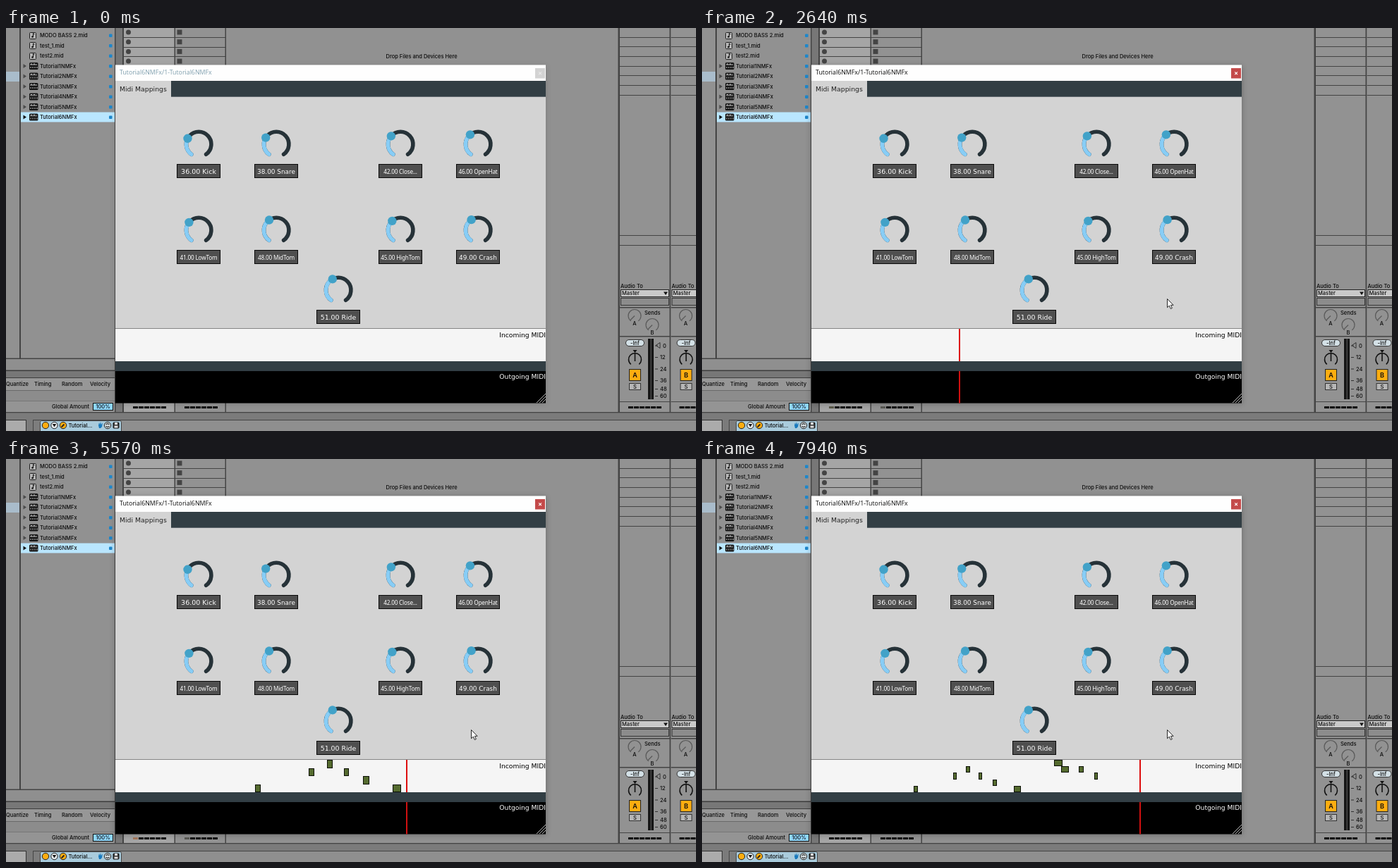
An HTML page that plays this animation: 978x572 px, repeating every 8000 ms.

```html
<!DOCTYPE html>
<html lang="en">
<head>
<meta charset="utf-8">
<title>Midi Mappings</title>
<style>
html, body { margin: 0; width: 100%; height: 100%; overflow: hidden; background: #919191; }
svg { display: block; width: 978px; height: 572px; }
text { white-space: pre; }
.ui { font: 500 7.5px Inter, sans-serif; fill: #0c0c0c; }
.plug { font: 9.2px "DejaVu Sans", sans-serif; }
.tight { font: 8.2px "Noto Sans", sans-serif; letter-spacing: -.2px; }
.title { font: 8.8px "Open Sans", sans-serif; }
</style>
</head>
<body>
<svg id="stage" viewBox="0 0 978 572" xmlns="http://www.w3.org/2000/svg"></svg>
<script>
const NS = 'http://www.w3.org/2000/svg';
const stage = document.getElementById('stage');

function add(tag, attrs, content) {
  const el = document.createElementNS(NS, tag);
  for (const k in attrs) el.setAttribute(k, attrs[k]);
  if (content) el.textContent = content;
  stage.appendChild(el);
  return el;
}
const rect = (x, y, width, height, fill, more) => add('rect', { x, y, width, height, fill, ...more });
const box = (x, y, w, h, fill, stroke = '#111', more) =>
  rect(x + .5, y + .5, w - 1, h - 1, fill, { stroke, 'stroke-width': 1, ...more });
const disc = (cx, cy, r, fill, more) => add('circle', { cx, cy, r, fill, ...more });
const path = (d, stroke, width = 1, more) =>
  add('path', { d, fill: 'none', stroke, 'stroke-width': width, ...more });
const shape = (d, fill, more) => add('path', { d, fill, ...more });
const text = (x, y, s, cls = 'ui', more) => add('text', { x, y, class: cls, ...more }, s);
const mid = { 'text-anchor': 'middle' };
const polar = (cx, cy, r, deg) => {
  const a = deg * Math.PI / 180;
  return [cx + r * Math.sin(a), cy - r * Math.cos(a)];
};
function arc(cx, cy, r, from, to) {
  const [x1, y1] = polar(cx, cy, r, from), [x2, y2] = polar(cx, cy, r, to);
  return `M${x1} ${y1}A${r} ${r} 0 ${to - from > 180 ? 1 : 0} 1 ${x2} ${y2}`;
}
function dashes(x, n = 6) {
  for (let i = 0; i < n; i++) rect(x + i * 8, 537, 7, 3, '#0a0a0a');
}

// ---- browser panel ----
function drawBrowser() {
  rect(0, 0, 155, 470, '#919191');
  rect(0, 62, 19, 14, '#a9bccb');
  rect(19, 0, 2, 469, '#444');
  const names = ['MODO BASS 2.mid', 'test_1.mid', 'test2.mid'];
  for (let i = 1; i <= 6; i++) names.push(`Tutorial${i}NMFx`);
  names.forEach((name, i) => {
    const y = 10.5 + i * 14.5;
    if (i === 8) rect(21, 119.5, 134, 14, '#b9e6ff');
    if (i < 3) {
      box(33, Math.round(y) - 5, 10, 10, '#b5b5b5', '#222', { rx: 1 });
      path(`M38.5 ${y + 2}v-5l2 1.5`, '#111');
      disc(37.5, y + 2, 1.3, '#111');
    } else {
      shape(`M24.5 ${y - 3}l4.5 3l-4.5 3z`, i === 8 ? '#111' : '#4a4a4a');
      rect(33, y - 5, 12.5, 10, '#151515', { rx: 1.5 });
      path(`M35 ${y - 1}v-2h2v2m2 0v-2h2v2m2 0v-2M35 ${y + 3}v-2m3 2v-2m3 2v-2m3 2v-2`, '#ddd', .9);
    }
    text(48, y + 2.7, name);
    rect(146, y - 2, 4.5, 4.5, '#1d87cc', { rx: 1 });
  });
  rect(0, 468.5, 155, 1.5, '#444');
  rect(0, 470, 155, 16, '#8f8f8f');
  rect(0, 486, 155, 11, '#777');
  rect(0, 485.5, 155, 1.5, '#3c3c3c');
  rect(0, 496, 155, 1.2, '#3c3c3c');
  rect(0, 497, 155, 17, '#979797');
  rect(0, 514, 155, 1, '#6a6a6a');
  rect(0, 515, 155, 15, '#8c8c8c');
  rect(0, 529, 155, 1, '#777');
  rect(0, 530, 155, 15, '#949494');
  [[0, 'Quantize'], [40, 'Timing'], [79, 'Random'], [119, 'Velocity']].forEach(([x, s]) => text(x, 508, s));
  text(65, 540, 'Global Amount');
  box(123, 532, 29, 11, '#8ed6fb');
  text(137.5, 540.2, '100%', 'ui', mid);
}

// ---- session tracks ----
function drawTracks() {
  rect(155, 0, 11, 545, '#777');
  rect(154, 0, 1.5, 545, '#444');
  rect(165, 0, 2, 545, '#444');
  rect(167, 0, 72, 545, '#a5a5a5');
  rect(240, 0, 71, 545, '#929292');
  for (let i = 0; i < 4; i++) {
    const y = 6 + i * 13.7;
    rect(167, Math.round(y + 7), 144, 1, '#444');
    disc(173.5, y, 3.5, '#444');
    rect(242.5, y - 3.5, 7, 7, '#444');
  }
  rect(238.5, 0, 1.5, 545, '#444');
  rect(310.5, 0, 1.5, 545, '#444');
  rect(167, 531, 144, 1, '#555');
  dashes(180);
  dashes(253);
  text(538.5, 43, 'Drop Files and Devices Here');
}

function returnTrack(x, w, letter) {
  rect(x, 0, w, 545, '#929292');
  for (let i = 1; i <= 7; i++) rect(x, Math.round(i * 13.65) - 1, w, 1, '#444');
  [294, 308].forEach(y => rect(x, y, w, 1, '#444'));
  text(x + 1, 369.3, 'Audio To');
  box(x + 1, 371, 69, 11, '#c9c9c9', '#222');
  text(x + 3, 379.2, 'Master');
  shape(`M${x + 62} 374.5h6l-3 4.5z`, '#111');
  box(x + 1, 383, 69, 11, '#8c8c8c', '#333');
  rect(x, 396, w, 1.5, '#444');
  const knob = (cx, cy, s) => {
    path(arc(cx, cy, 9, 215, 505), '#5a5a5a', 1.2);
    path(`M${cx} ${cy}L${cx - 6} ${cy + 6}`, '#5a5a5a', 1.2);
    text(cx, cy + 13, s, 'ui', mid);
  };
  knob(x + 21, 408.5, 'A');
  text(x + 35, 406.5, 'Sends');
  knob(x + 46, 421.5, 'B');
  rect(x, 437, w, 1.5, '#444');
  box(x + 8, 442, 27, 10, '#d3e0e6', '#333', { rx: 4.5 });
  text(x + 21.5, 449.7, '-Inf', 'ui', mid);
  shape(`M${x + 18.5} 457h6l-3 4z`, '#111');
  path(arc(x + 21.5, 470.5, 9, 220, 500), '#111', 1.6);
  path(`M${x + 21.5} 462v11`, '#111', 1.6);
  box(x + 13, 484, 17, 17, '#ffad10', '#222');
  text(x + 21.5, 495.6, letter, 'ui', { ...mid, style: 'font-size:9px;font-weight:600' });
  box(x + 13, 504, 17, 10, '#b7b7b7', '#333');
  text(x + 21.5, 511.8, 'S', 'ui', mid);
  rect(x + 40, 441, 8, 86, '#151515');
  rect(x + 43.7, 441, .8, 86, '#777');
  path(`M${x + 51} 450.5l6 -4v8z`, '#333');
  [0, 12, 24, 36, 48, 60].forEach((v, i) => {
    const y = [450.5, 467, 483.5, 500, 512, 522][i];
    rect(x + 50, y, 4, 1, '#333');
    text(x + (v ? 57 : 61), y + 3, String(v));
  });
  rect(x, 530, w, 1, '#444');
  dashes(x + 12);
}

function drawFooter() {
  rect(0, 545, 978, 27, '#7b7b7b');
  rect(0, 545, 978, 1.3, '#444');
  box(-1, 556, 30, 20, '#ababab', '#333');
  box(38, 556, 945, 20, '#8f8f8f', '#444');
  rect(39, 557, 9, 15, '#7d7d7d');
  box(48, 557, 116, 20, '#a9cbdc', '#444', { rx: 2 });
  const ring = { stroke: '#222', 'stroke-width': 1 };
  disc(56, 564, 4.7, '#ffad10', ring);
  disc(68.5, 564, 4.7, '#e2e8ea', ring);
  shape('M65.8 562h5.4l-2.7 4.3z', '#111');
  disc(81, 564, 4.7, '#ffad10', ring);
  path('M78.5 566.5l4-4', '#222', 1.8);
  text(88.5, 566.8, 'Tutorial...');
  shape('M131 564l1-4 1 3 1-4 1 4 2-3-1 6-2 2h-2z', '#1879bd');
  disc(144, 564, 4.7, '#d5dde0', ring);
  path('M141.5 563a3 3 0 0 1 5 0m0 2a3 3 0 0 1-5 0', '#222', 1.1);
  box(151.5, 559.5, 9, 9, '#333', '#111', { rx: 1 });
  rect(154, 560, 4, 3, '#ddd');
  rect(153.5, 564.5, 5, 3, '#ddd');
}

// ---- plug-in window ----
function drawKnob(left, cy, value, name, cls, size) {
  const cx = left + 31.2, at = 216 + 288 * value / 127;
  const round = { 'stroke-linecap': 'round' };
  path(arc(cx, cy, 17.7, 216, 504), '#263238', 5.6, round);
  path(arc(cx, cy, 17.7, 216, at), '#87cdf6', 5.6, round);
  const [x, y] = polar(cx, cy, 17.7, at);
  disc(x, y, 6.2, '#42a2c8');
  box(left, cy + 28, 62, 20, '#4f4f4f', '#080808');
  text(left + 31, cy + 41.7, `${value}.00 ${name}`, cls,
    { ...mid, fill: '#fff', style: size ? `font-size:${size}px` : '' });
}

let shadow, title, closeBox, closeX;
function drawWindow() {
  const blur = add('filter', { id: 'blur', x: '-10%', y: '-10%', width: '120%', height: '120%' });
  const g = document.createElementNS(NS, 'feGaussianBlur');
  g.setAttribute('stdDeviation', 4);
  blur.appendChild(g);
  shadow = rect(155, 54, 610, 479, '#000', { filter: 'url(#blur)' });
  rect(155, 52.4, 610, 23, '#fefefe');
  title = text(161, 66.2, 'Tutorial6NMFx/1-Tutorial6NMFx', 'title');
  closeBox = rect(750, 57, 14, 14.5, '#c75050');
  closeX = path('M755.2 62.4l3.8 3.8m0-3.8l-3.8 3.8', '#fff', 1.1);
  rect(155, 75, 610, 23, '#323e44');
  rect(155, 75, 79, 23, '#d3d3d3');
  rect(155, 97.7, 610, 329.3, '#d3d3d3');
  text(161, 90, 'Midi Mappings', 'plug', { style: 'font-size:9.3px', fill: '#222' });
  [
    [242, 165, 36, 'Kick', 'plug', 9.5], [352, 165, 38, 'Snare', 'plug', 8.9],
    [528, 165, 42, 'Close...', 'tight'], [638, 165, 46, 'OpenHat', 'tight'],
    [242, 287, 41, 'LowTom', 'tight'], [352, 287, 48, 'MidTom', 'tight'],
    [528, 287, 45, 'HighTom', 'tight'], [638, 287, 49, 'Crash', 'plug', 8.9],
    [440, 372, 51, 'Ride', 'plug', 9.4]
  ].forEach(k => drawKnob(...k));
  rect(155, 427, 610, 46, '#f5f5f5');
  rect(155, 426, 610, 1, '#858585');
  rect(155, 473, 610, 14, '#323e44');
  rect(155, 487, 610, 45.5, '#000');
  text(765, 438.5, 'Incoming MIDI', 'plug', { 'text-anchor': 'end', fill: '#000' });
  text(765, 498, 'Outgoing MIDI', 'plug', { 'text-anchor': 'end', fill: '#fff' });
  path('M752 532L765 519M756 532L765 523M760 532L765 527', '#ccc', .9);
}

drawBrowser();
drawTracks();
rect(867.5, 0, 2.5, 545, '#444');
returnTrack(870, 71, 'A');
rect(940.5, 0, 2, 545, '#444');
returnTrack(942.5, 36, 'B');
drawFooter();
const led1 = rect(180, 537, 7, 3, '#0a0a0a');
const led2 = rect(253, 537, 7, 3, '#0a0a0a');
drawWindow();

// ---- moving parts ----
// start and end in seconds of playback, pitch step
const notes = [
  [2.1, 2.19, 1], [2.912, 2.988, 3], [3.18, 3.268, 4], [3.442, 3.515, 3], [3.722, 3.82, 2],
  [4.166, 4.3, 1], [4.995, 5.155, 5], [5.14, 5.292, 4], [5.495, 5.604, 4], [5.814, 5.887, 3]
];
const noteEls = notes.map(() => rect(0, 0, 0, 0, '#556b2f', { stroke: '#0b0f05', 'stroke-width': 1 }));
const heads = [rect(0, 427, 2, 46, '#dd0d0d'), rect(0, 487, 2, 45.5, '#d01010')];
const cursor = shape('M0 0V12.2L2.8 9.6L4.8 14L6.8 13.1L4.9 8.8H8.6Z', '#fff',
  { stroke: '#111', 'stroke-width': .9, 'stroke-linejoin': 'round' });

const LOOP = 8000, PLAY = 1240, STEP = 69.79, ORIGIN = 1195, LEAD = 2.1, LAG = .072;
const show = (el, on) => el.setAttribute('visibility', on ? 'visible' : 'hidden');
const set = (el, attrs) => { for (const k in attrs) el.setAttribute(k, attrs[k]); };
const ease = p => p * p * (3 - 2 * p);
const clamp = v => Math.max(0, Math.min(1, v));
const lightAt = (spans, t) => (spans.find(([a, b]) => t >= a && t < b) || [0, 0, '#0a0a0a'])[2];

const lights1 = [
  [2495, 2850, '#5b5a4a'], [4440, 4590, '#c2481c'], [4590, 4730, '#8a6248'],
  [5360, 5500, '#c2481c'], [5500, 5640, '#a5785c'], [6200, 6340, '#c2481c'],
  [6340, 6480, '#6f6833'], [6690, 6830, '#c2481c'], [6830, 6970, '#6f6833']
];
const lights2 = [[70, 980, '#1f1f1f'], [2495, 7030, '#5a5a55']];

function cursorAt(t) {
  const p = ease(clamp((t - 220) / 490)), q = ease(clamp((t - 2150) / 420));
  return [803 - 173 * p + 29.5 * q, 524 - 125.5 * p - 14 * q];
}

function drawRoll(t) {
  const T = (t - ORIGIN) / 1000;
  const on = t >= PLAY;
  const scale = 610 / Math.max(2 * LEAD, T + LEAD);
  const px = time => Math.round(155 + time * scale);
  heads.forEach(h => { show(h, on); set(h, { x: Math.round(154.6 + T * scale) }); });
  // a note shows up shortly after it starts
  const heard = n => on && n[0] + LAG < T;
  const lanes = [...new Set(notes.filter(heard).map(n => n[2]))].sort((a, b) => b - a);
  const h = 46 / (lanes.length || 1);
  notes.forEach((note, i) => {
    const [from, to, pitch] = note;
    show(noteEls[i], heard(note));
    if (!heard(note)) return;
    const x = px(from), row = lanes.indexOf(pitch);
    const top = Math.round(427 + row * h), bottom = Math.round(427 + (row + 1) * h);
    set(noteEls[i], {
      x: x + .5, y: top + .5,
      width: Math.max(1, px(Math.min(to, T)) - x - 1), height: bottom - top - 1
    });
  });
}

function draw(now) {
  let t = now % LOOP;
  // the picture advances in even steps, holding in between
  const base = t < PLAY ? 220 : PLAY;
  if (t >= base) t = base + Math.floor((t - base + 5) / STEP) * STEP;
  const active = t >= 630;
  set(shadow, { opacity: active ? .28 : .14 });
  set(title, { fill: active ? '#0c0c0c' : '#7f9fae' });
  set(closeBox, { fill: active ? '#c44a4a' : '#d3d3d3' });
  set(closeX, { stroke: active ? '#fff' : '#e9e9e9' });
  show(cursor, t >= 220);
  set(cursor, { transform: `translate(${cursorAt(t)})` });
  set(led1, { fill: lightAt(lights1, t) });
  set(led2, { fill: lightAt(lights2, t) });
  drawRoll(t);
}

const begin = performance.now();
function frame() {
  draw(performance.now() - begin);
  requestAnimationFrame(frame);
}
frame();
</script>
</body>
</html>
```
